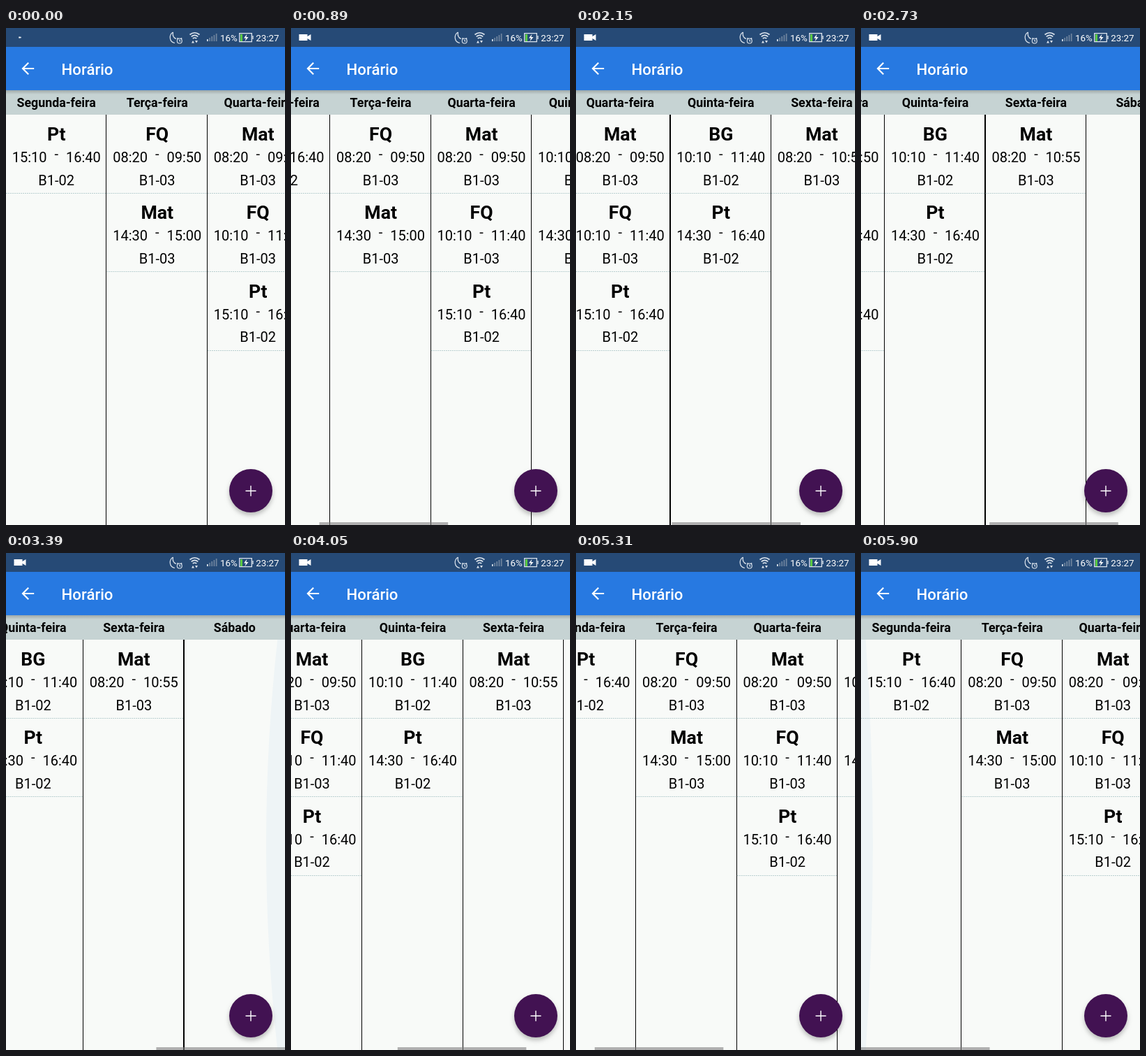
Recreate the animation shown at these times as an HTML page with a canvas. Size 400 by 711 pixels, loop 6000 ms.

```html
<!DOCTYPE html>
<html lang="pt">
<head>
<meta charset="utf-8">
<title>Horário</title>
<style>
html, body { margin: 0; width: 100%; height: 100%; overflow: hidden; background: #f8faf8; }
canvas { display: block; width: 400px; height: 711px; }
</style>
</head>
<body>
<canvas id="stage"></canvas>
<script>
const W = 400, H = 711, LOOP = 6000, TICK = 96.8;
const COL = 144.5, ROW = 112.4, TOP = 124, CONTENT = COL * 6;
const days = [
  ['Segunda-feira', ['Pt', '15:10', '16:40', 'B1-02']],
  ['Terça-feira', ['FQ', '08:20', '09:50', 'B1-03'], ['Mat', '14:30', '15:00', 'B1-03']],
  ['Quarta-feira', ['Mat', '08:20', '09:50', 'B1-03'], ['FQ', '10:10', '11:40', 'B1-03'], ['Pt', '15:10', '16:40', 'B1-02']],
  ['Quinta-feira', ['BG', '10:10', '11:40', 'B1-02'], ['Pt', '14:30', '16:40', 'B1-02']],
  ['Sexta-feira', ['Mat', '08:20', '10:55', 'B1-03']],
  ['Sábado']
];
// [tick, value] pairs
const scrollKeys = [[3, 0], [15, 176.2], [22, 297.9], [32, 466.9], [36, 466.9], [42, 331.2], [50, 155], [58, 0]];
const rightGlow = [[32, 0], [35, 27], [38, 0]];
const leftGlow = [[58, 0], [60, 17]];

const canvas = document.getElementById('stage');
const dpr = window.devicePixelRatio || 1;
canvas.width = W * dpr;
canvas.height = H * dpr;
const ctx = canvas.getContext('2d');
ctx.scale(dpr, dpr);

function track(keys, t) {
  const i = keys.findIndex(k => k[0] > t);
  if (i === 0) return keys[0][1];
  if (i < 0) return keys[keys.length - 1][1];
  const [t0, a] = keys[i - 1], [t1, b] = keys[i];
  return a + (b - a) * (t - t0) / (t1 - t0);
}

function rect(x, y, w, h, color) {
  ctx.fillStyle = color;
  ctx.fillRect(x, y, w, h);
}

function text(str, x, y, size, weight = 400, color = '#000', align = 'center') {
  ctx.font = `${weight} ${size}px Roboto, sans-serif`;
  ctx.textAlign = align;
  ctx.fillStyle = color;
  ctx.fillText(str, x, y);
}

function shape(d, color, lineWidth) {
  const path = new Path2D(d);
  if (lineWidth) {
    ctx.strokeStyle = color;
    ctx.lineWidth = lineWidth;
    ctx.stroke(path);
  } else {
    ctx.fillStyle = color;
    ctx.fill(path);
  }
}

function lesson([subject, start, end, room], mid, y) {
  text(subject, mid, y + 37, 26.67, 700);
  text(start, mid - 38.6, y + 68, 20);
  text('-', mid, y + 63, 20);
  text(end, mid + 38.6, y + 68, 20);
  text(room, mid, y + 100.5, 20);
}

// column border snapped to whole pixels
function divider(x) {
  const left = Math.round(x - 1.3);
  rect(left, TOP, Math.round(x - 0.1) - left, H - TOP, '#000');
}

function timetable(scroll) {
  rect(0, 89, W, 35, '#c6d3d3');
  days.forEach(([name, ...lessons], i) => {
    const x = i * COL - scroll, mid = x + 72.2;
    text(name, mid, 113.3, 17.78, 700);
    lessons.forEach((item, row) => {
      lesson(item, mid, TOP + row * ROW);
      ctx.setLineDash([2, 1]);
      const y = Math.floor(TOP + (row + 1) * ROW) + 0.5;
      shape(`M${x} ${y}h${COL - 1.4}`, '#b9cfd0', 1);
      ctx.setLineDash([]);
    });
    if (i < days.length - 1) divider(x + COL);
  });
}

function edgeGlow(x, depth) {
  if (!depth) return;
  const near = depth * 0.4, far = depth * 1.6, s = x ? -1 : 1;
  shape(`M${x} ${TOP}H${x + s * near}Q${x + s * far} 417 ${x + s * near} ${H}H${x}Z`, 'rgba(70,150,220,.055)');
}

function toolbar() {
  const shadow = ctx.createLinearGradient(0, 89, 0, 95);
  shadow.addColorStop(0, 'rgba(0,0,0,.2)');
  shadow.addColorStop(1, 'rgba(0,0,0,0)');
  rect(0, 89, W, 6, shadow);
  rect(0, 27, W, 62, '#2779e1');
  shape('M40.2 58H24M32.2 49.8L24 58L32.2 66.2', '#fff', 2.2);
  text('Horário', 79.5, 66.5, 22.2, 500, '#fff', 'left');
}

function statusBar(tick) {
  const pale = '#dce4ed';
  rect(0, 0, W, 27, '#264a76');

  // the recording icon grows in
  const grow = Math.min(1, 0.2 + tick * 0.4);
  ctx.save();
  ctx.translate(20, 13.5);
  ctx.scale(grow, grow);
  shape('M-8.5 -4.5H3.5V-1.5L8.5 -4.5V4.5L3.5 1.5V4.5H-8.5Z', '#fff');
  ctx.restore();

  shape('M239.5 6C233 10 234 20 242 21.5M239.5 6C238.5 11 240 14 244 15.5', pale, 1.2);
  shape('M252.3 18.5a3.5 3.5 0 1 1-7 0a3.5 3.5 0 1 1 7 0M248.8 16.5v2.2h1.8M245.2 15.4l1.5-1.2M252.4 15.4l-1.5-1.2', pale, 1.1);
  shape('M263.5 9.5Q270.5 4 277.5 9.5M265.7 12.3Q270.5 8.5 275.3 12.3M267.8 15Q270.5 13 273.2 15', pale, 1.7);
  shape('M266 21.5h4l-2-3.5zM271 18h4l-2 3.5z', pale);
  for (let i = 0; i < 5; i++) {
    const h = 3 + i * 2;
    rect(288 + i * 3.2, 19 - h, 1.7, h, i < 1 ? pale : '#70859f');
  }
  text('16%', 307, 18.8, 13.33, 400, '#fff', 'left');
  rect(336, 9, 3, 10, '#58c842');
  shape('M334.7 7.7h17.6v12h-17.6zM354 11v5', pale, 1.3);
  shape('M345.5 8.7l-4.5 5.8h3l-1.5 4.5l5-6h-3.2z', '#fff');
  text('23:27', 391.5, 18.8, 13.33, 400, '#fff', 'right');
}

function addButton() {
  ctx.save();
  ctx.shadowColor = 'rgba(0,0,0,.25)';
  ctx.shadowBlur = 6 * dpr;
  ctx.shadowOffsetY = 4 * dpr;
  shape('M382 662a31 31 0 1 1-62 0a31 31 0 1 1 62 0', '#421252');
  ctx.restore();
  shape('M343.5 662.3h15M351 654.8v15', '#fff', 1.4);
}

function draw(now) {
  const tick = Math.floor((now % LOOP + 25) / TICK);
  const scroll = track(scrollKeys, tick);
  rect(0, 0, W, H, '#f8faf8');
  timetable(scroll);
  edgeGlow(0, track(leftGlow, tick));
  edgeGlow(W, track(rightGlow, tick));
  if (tick >= 3) rect(scroll * W / CONTENT, 707, W * W / CONTENT, 4, 'rgba(125,125,125,.58)');
  toolbar();
  statusBar(tick);
  addButton();
}

let begin;
function loop(now) {
  begin ??= now;
  draw(now - begin);
  requestAnimationFrame(loop);
}
requestAnimationFrame(loop);
</script>
</body>
</html>
```
